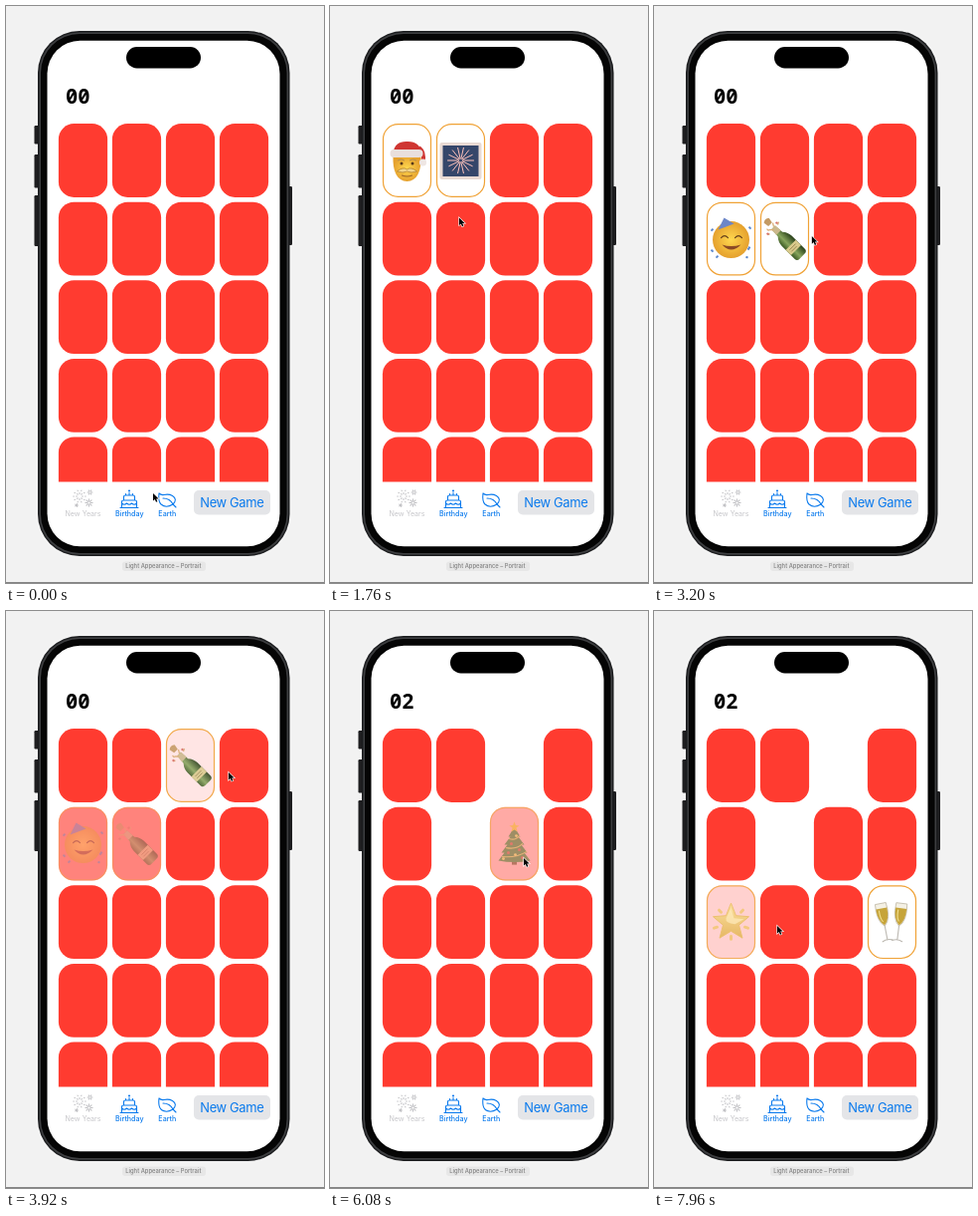
Recreate the animation shown at these times as an HTML page. Size 320 px wide and 579 px high, loop 8000 ms.

```html
<!DOCTYPE html>
<html lang="en">
<head>
<meta charset="utf-8">
<title>Memory game</title>
<style>
  html, body { margin: 0; width: 100%; height: 100%; overflow: hidden; background: #f2f2f2; }
  svg { display: block; width: 100vw; height: 100vh; }
  text { font-family: Inter, "Open Sans", sans-serif; text-anchor: middle; }
  .score { font: 700 20.5px "Noto Sans Mono", "DejaVu Sans Mono", monospace; text-anchor: start; }
  .label { font-size: 7.1px; font-weight: 500; }
  .line { fill: none; stroke-width: 1.1; stroke-linecap: round; stroke-linejoin: round; }
</style>
</head>
<body>
<svg viewBox="0 0 320 579" preserveAspectRatio="none">
  <defs>
    <clipPath id="list"><rect x="42" y="110" width="234" height="367.5"/></clipPath>
    <linearGradient id="glass" x2="1"><stop stop-color="#3c5a24"/><stop offset=".4" stop-color="#86a45c"/><stop offset="1" stop-color="#29401a"/></linearGradient>
    <linearGradient id="gold" x2="0" y2="1"><stop stop-color="#fbe590"/><stop offset="1" stop-color="#dfb045"/></linearGradient>
    <radialGradient id="skin"><stop stop-color="#ffd84f"/><stop offset="1" stop-color="#e5a02d"/></radialGradient>

    <g id="santa">
      <path d="M-14-5Q-15 20 0 21Q15 20 14-5Z" fill="url(#skin)"/>
      <path d="M-14-8Q-12-20 1-19Q13-19 15-7Z" fill="#cf3632"/>
      <path d="M12-13Q18-8 16 1" fill="none" stroke="#cf3632" stroke-width="4"/>
      <rect x="-17" y="-11" width="33" height="8" rx="4" fill="#e9dfdc"/>
      <circle cx="16" cy="2" r="3.6" fill="#eee6e3"/>
      <path d="M-9 0Q-6-2-3 0M3 0Q6-2 9 0" class="line" stroke="#b88f4b"/>
      <circle cx="-5.5" cy="3" r="1.5" fill="#583919"/><circle cx="5.5" cy="3" r="1.5" fill="#583919"/>
      <path d="M-10 11Q-4 6 0 9Q4 6 10 11Q4 13 0 11Q-4 13-10 11" fill="#f2d58c" stroke="#ab7b2d" stroke-width=".7"/>
      <path d="M-5 15Q0 17 5 15" class="line" stroke="#9a6328"/>
    </g>

    <g id="fireworks">
      <rect x="-21" y="-18" width="42" height="37" rx="2" fill="#e8d9d3"/>
      <rect x="-18" y="-15" width="36" height="31" fill="#35466a"/>
      <g id="rays" stroke="#ffc2bb" stroke-linecap="round"></g>
    </g>

    <g id="party">
      <circle cy="1" r="18.5" fill="url(#skin)"/>
      <path d="M-13-9L-7-21L3-15Z" fill="#6c86c8"/>
      <path d="M-10-1Q-6.5-5-3-1M4-1Q7.5-5 11-1" class="line" stroke="#66401a"/>
      <path d="M-9 6Q0 16 10 6Q0 9-9 6" fill="#8b4a25"/>
      <path d="M-20-8l2-2M-20 11l2 2M18-12l2 2M19 8l-2 3M-15 19l2-2M15 18l2 1" stroke="#5b87cc" stroke-width="2"/>
    </g>

    <g id="bottle">
      <g transform="rotate(-45) scale(1.08)">
        <path d="M-2.3-15H2.3L3-6Q6.6-2 6.6 3V20Q6.6 23 3 23H-3Q-6.6 23-6.6 20V3Q-6.6-2-3-6Z" fill="url(#glass)"/>
        <path d="M-2.6-15H2.6L3-8H-3Z" fill="#cbb88c"/>
        <path d="M-6.6 8H6.6V15H-6.6Z" fill="#d9ca8c"/>
        <path d="M-4 10.5H4M-4 12.8H3" stroke="#8d7a45" stroke-width=".7"/>
        <path d="M-3.3-24Q0-27 3.3-24L2.4-19H-2.4Z" fill="#c49a63"/>
      </g>
      <path d="M-18-10l2 2M-15-5l-2 1M-6-17l-1 3M-11-9l-5 0M-11-12l-1-4" stroke="#d9ad75" stroke-width="1.3"/>
      <circle cx="-8" cy="-16" r="1.2" fill="#d66f64"/><circle cx="-17" cy="-5" r="1.2" fill="#d66f64"/>
    </g>

    <g id="clock">
      <circle r="19" fill="#aaa59c"/>
      <circle r="16.8" fill="#f1eee8"/>
      <g id="ticks" stroke="#8d8880"></g>
      <path d="M0 0V-12" stroke="#4c4843" stroke-width="1.6" stroke-linecap="round"/>
    </g>

    <g id="tree">
      <rect x="-2.5" y="14" width="5" height="7" fill="#80502f"/>
      <path d="M0-17L6-7L4-7L10 1L7 1L13 9L10 9L16 17Q0 20-16 17L-10 9L-13 9L-7 1L-10 1L-4-7L-6-7Z" fill="#557a36"/>
      <path d="M-5-5Q1-3 5-8M-8 4Q2 6 8 0M-12 13Q3 14 12 8" class="line" stroke="#d8bb56"/>
      <g fill="#cc5640"><circle cx="-3" r="1.5"/><circle cx="5" cy="6" r="1.5"/><circle cx="-6" cy="9" r="1.5"/><circle cx="8" cy="14" r="1.5"/></g>
      <g fill="#edcc5f"><circle cx="2" cy="-8" r="1.4"/><circle cx="1" cy="11" r="1.4"/><circle cx="-11" cy="15" r="1.4"/></g>
      <path d="M0-22L1.4-18.5L5-18L2-16L3-12L0-14L-3-12L-2-16L-5-18L-1.4-18.5Z" fill="#f5b92e"/>
    </g>

    <g id="flute">
      <path d="M-5.5-19H5.5Q7.5-2 0 4Q-7.5-2-5.5-19Z" fill="#f4f0e4" stroke="#b9b09c" stroke-width=".7"/>
      <path d="M-5.6-14H5.6Q6-2 0 3Q-6-2-5.6-14Z" fill="#c6a43a"/>
      <path d="M-2.8-12Q-3.2-4-1-1" class="line" stroke="#f3e08e"/>
      <path d="M0 4V18M-5 19Q0 16.500 5 19" class="line" stroke="#bdb9b2"/>
    </g>
    <g id="toast">
      <use href="#flute" transform="translate(-8) rotate(-11)"/>
      <use href="#flute" transform="translate(7.500) rotate(7)"/>
    </g>

    <g id="star">
      <path d="M-12-12L-10-10M12-12L10-10M-17 6L-14 5M17 6L14 5M0 17V14" stroke="#f1c668" stroke-width="3" stroke-linecap="round"/>
      <path d="M0-19L5-6.500L18-5.500L8 3L11.500 16L0 9L-11.500 16L-8 3L-18-5.500L-5-6.500Z" fill="url(#gold)" stroke="#e6bb52" stroke-linejoin="round"/>
      <path d="M0-14L3-4L13-3L4 2Q-6 1-5-4Z" fill="#fff3b8" opacity=".7"/>
    </g>
  </defs>

  <rect width="320" height="579" fill="#f2f2f2"/>
  <rect y="578" width="320" height="1" fill="#858585"/>

  <g fill="#1d1d1f">
    <rect x="28.500" y="120" width="6" height="18.500" rx="1.200"/>
    <rect x="28.500" y="149" width="6" height="33.500" rx="1.200"/>
    <rect x="28.500" y="190" width="6" height="51" rx="1.200"/>
    <rect x="283" y="181" width="5" height="59" rx="1.200"/>
  </g>
  <rect x="32" y="25" width="253.500" height="527" rx="42" fill="#1b1c1e"/>
  <rect x="33.500" y="26.500" width="250.500" height="524" rx="40.500" fill="#3d3e40"/>
  <rect x="35" y="28" width="247.500" height="521" rx="39" fill="#050505"/>
  <rect x="41.500" y="34.800" width="234" height="507.500" rx="33" fill="#fff"/>
  <rect x="121" y="41" width="75" height="21.500" rx="10.700"/>

  <text id="score" class="score" x="60" y="98">00</text>
  <g id="cards" clip-path="url(#list)"></g>

  <g stroke="#c0c0c4" class="line" id="bursts"></g>
  <text class="label" x="77.500" y="512" fill="#c6c6ca" style="font-weight:400">New Years</text>
  <g fill="#0a7aed" stroke="none">
    <path class="line" stroke="#0a7aed" d="M115 503.500H133M116.500 503V497.500Q116.500 496 118 496H130Q131.500 496 131.500 497.500V503M118.500 496V492.500Q118.500 491 120 491H128Q129.500 491 129.500 492.500V496M124 491V488.500M120.500 491V489.500M127.500 491V489.500M116.500 499Q119 501.500 121.500 499Q124 501.500 126.500 499Q129 501.500 131.500 499"/>
    <circle cx="124" cy="486.500" r="1.100"/>
    <text class="label" x="124.300" y="512">Birthday</text>
    <path class="line" stroke="#0a7aed" d="M154 489Q153 497 156 500Q161 504.500 168 500Q173 495 167.500 491.500Q164 489.500 159 490.500Q156 491 154 489M158 494Q165 494 168 500L171 503"/>
    <text class="label" x="162.300" y="512">Earth</text>
    <rect x="189" y="486" width="77" height="24.500" rx="5" fill="#e4e5e8"/>
    <text x="227.300" y="502.700" font-size="12.900" letter-spacing="-.350">New Game</text>
  </g>

  <rect x="117" y="557.500" width="84" height="9.500" rx="3" fill="#e7e7e7"/>
  <text x="158.300" y="564.400" font-size="5.850" font-weight="500" fill="#808080">Light Appearance – Portrait</text>

  <path id="cursor" d="M0 0V7.600L1.800 6L3 8.800L4.400 8.200L3.200 5.500H5.600Z" stroke="#fff" stroke-width="1.200" paint-order="stroke"/>
</svg>

<script>
const LOOP = 8000, FADE = 350, MATCH = 5890;
const CARD = { x: 52.9, y: 118.1, w: 49.2, h: 73.8, gap: 4.8, r: 15.5 };
const $ = id => document.getElementById(id);
const clamp = v => Math.min(1, Math.max(0, v));
const ease = v => (v = clamp(v), v * v * (3 - 2 * v));

// Times alternate: face up, face down, ...
const played = {
  0: { art: "santa", flips: [780, 2090] },
  1: { art: "fireworks", flips: [1400, 2090] },
  2: { art: "bottle", flips: [3650, 4740, 5130], matched: true },
  3: { art: "clock", flips: [4140, 4740] },
  4: { art: "party", flips: [2650, 3715] },
  5: { art: "bottle", flips: [2010, 3715, 4640], matched: true },
  6: { art: "tree", flips: [5890, 7080] },
  7: { art: "clock", flips: [6440, 7080] },
  8: { art: "star", flips: [7720] },
  11: { art: "toast", flips: [7000] }
};

// Pointer tip: time, x, y
const path = [
  [20, 148, 489], [280, 114, 168], [480, 114, 168], [700, 84, 156], [820, 84, 156],
  [1040, 114, 153], [1260, 130, 154], [1450, 130, 156], [1900, 130, 229],
  [2100, 130, 232], [2360, 99, 241], [2560, 83, 241], [2700, 83, 242],
  [2860, 115, 282], [3000, 145, 268], [3500, 184, 164], [3700, 188, 163],
  [3920, 224, 162], [4080, 237, 161], [4200, 237, 161], [4540, 139, 228],
  [4680, 139, 229], [4880, 148, 228], [5080, 180, 170], [5400, 180, 171],
  [5520, 180, 171], [5820, 184, 239], [5920, 185, 241], [6080, 195, 248],
  [6360, 234, 238], [6500, 234, 239], [6900, 238, 312], [7100, 238, 314],
  [7600, 86, 318], [7760, 86, 318], [7960, 124, 316]
];

function rays(cx, cy, r0, r1, n) {
  let d = "";
  for (let i = 0; i < n; i++) {
    const a = i / n * Math.PI * 2, c = Math.cos(a), s = Math.sin(a);
    d += `M${cx + c * r0} ${cy + s * r0}L${cx + c * r1} ${cy + s * r1}`;
  }
  return `<path d="${d}"/>`;
}

function buildCards() {
  const { x, y, w, h, gap, r } = CARD;
  let html = "";
  for (let i = 0; i < 20; i++) {
    const left = x + i % 4 * (w + gap), top = y + Math.floor(i / 4) * (h + gap);
    const card = played[i];
    const face = card ? `<g id="face${i}">
      <rect x=".6" y=".6" width="${w - 1.2}" height="${h - 1.2}" rx="${r - .6}" fill="none" stroke="#f0a236" stroke-width="1.2"/>
      <use href="#${card.art}" transform="translate(${w / 2} ${h / 2})"/></g>` : "";
    html += `<g id="card${i}" transform="translate(${left} ${top})">
      <rect id="back${i}" width="${w}" height="${h}" rx="${r}" fill="#ff3b30"/>${face}</g>`;
  }
  $("cards").innerHTML = html;
}

function faceUp(flips, t) {
  return flips.reduce((p, at, i) => p + ((i % 2 ? 0 : 1) - p) * ease((t - at) / FADE), 0);
}

function pointer(t) {
  const next = path.findIndex(k => k[0] > t);
  if (next === 0) return path[0].slice(1);
  if (next < 0) return path[path.length - 1].slice(1);
  const a = path[next - 1], b = path[next];
  const k = ease((t - a[0]) / (b[0] - a[0]));
  return [a[1] + (b[1] - a[1]) * k, a[2] + (b[2] - a[2]) * k];
}

function draw(t) {
  for (const [i, card] of Object.entries(played)) {
    const p = faceUp(card.flips, t);
    $("face" + i).setAttribute("opacity", p);
    $("back" + i).setAttribute("opacity", 1 - p);
    if (card.matched) $("card" + i).setAttribute("opacity", 1 - ease((t - MATCH) / 160));
  }
  $("score").textContent = t < MATCH ? "00" : "02";
  $("cursor").setAttribute("transform", `translate(${pointer(t)})`);
}

$("rays").innerHTML = rays(0, 0, 2, 13, 14);
$("ticks").innerHTML = rays(0, 0, 13.5, 15.5, 12);
$("bursts").innerHTML = rays(74, 492, 2.6, 3.4, 8) + rays(74, 492, 5.6, 6.2, 10) +
  rays(84.5, 488, 1.2, 2.4, 6) + rays(83.5, 498.5, 1.5, 3.6, 8) + rays(71, 501, .6, 1.5, 5);
buildCards();

const start = performance.now();
function tick() {
  draw((performance.now() - start) % LOOP);
  requestAnimationFrame(tick);
}
draw(0);
requestAnimationFrame(tick);
</script>
</body>
</html>
```
